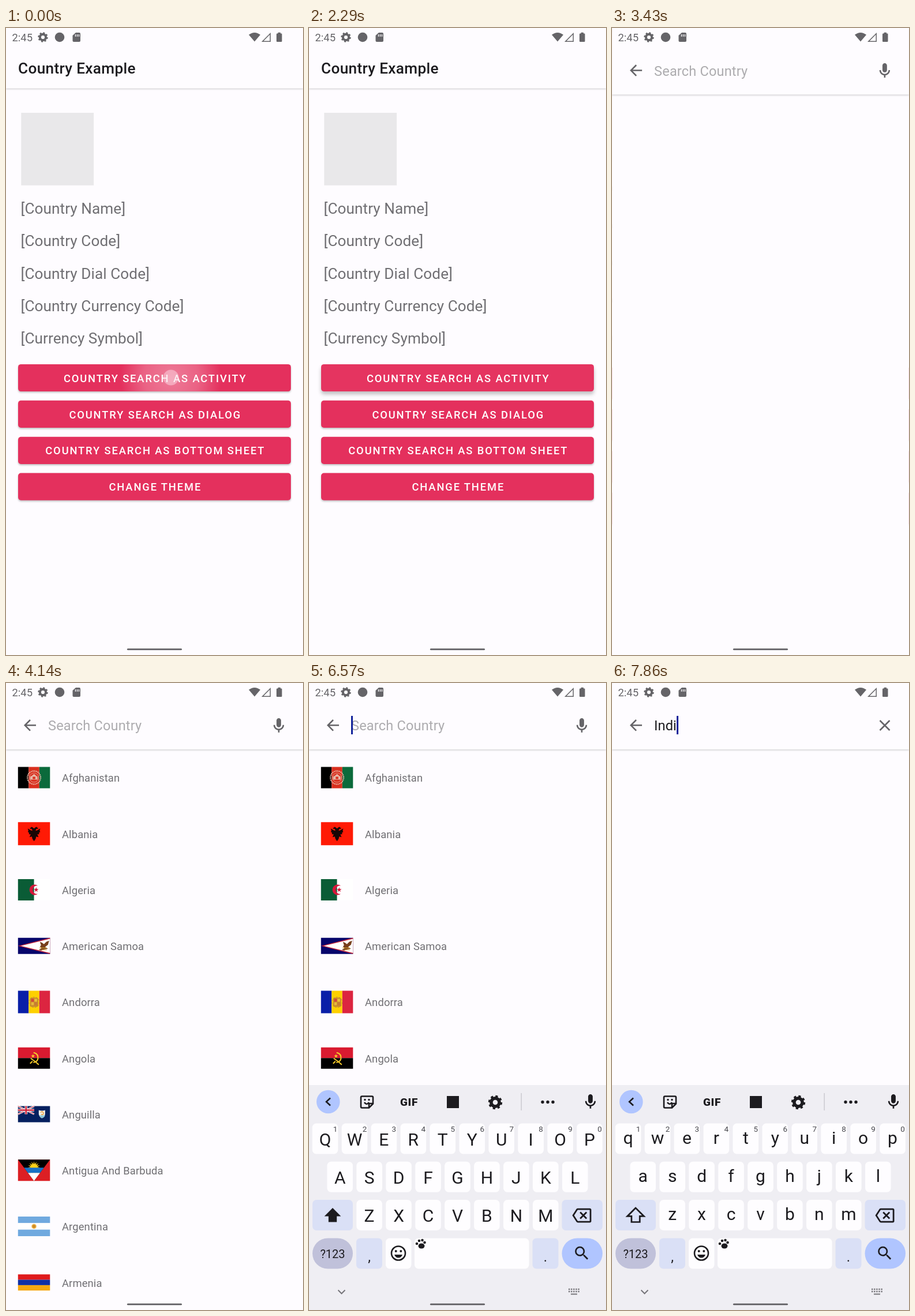
These frames come from a looping animation (515 px wide and 1087 px high, 8000 ms). An HTML page:

```html
<!DOCTYPE html>
<html lang="en">
<head>
<meta charset="utf-8">
<title>Country picker</title>
<style>
html, body { margin: 0; width: 100%; height: 100%; overflow: hidden; background: #fefcff; }
svg { display: block; width: 100vw; height: 100vh; font-family: Roboto, "Noto Sans", sans-serif; }
.bar { fill: #fefcff; filter: drop-shadow(0 1px 1.5px rgba(0,0,0,.22)); }
.button { fill: #e4305d; filter: drop-shadow(0 2px 1.5px rgba(0,0,0,.24)); }
.label { fill: #fff; font-size: 18.36px; font-weight: 500; letter-spacing: 1.86px; text-anchor: middle; }
.line { fill: none; stroke-width: 2.6; }
.mid { text-anchor: middle; }
</style>
</head>
<body>
<svg id="stage" viewBox="0 0 515 1087"></svg>
<script>
const GREY = '#656468', INK = '#1c1b1f', PAPER = '#fefcff';

const rect = (x, y, w, h, fill, r = 0, more = '') =>
  `<rect x="${x}" y="${y}" width="${w}" height="${h}" rx="${r}" fill="${fill}" ${more}/>`;
const dot = (x, y, r, fill, more = '') => `<circle cx="${x}" cy="${y}" r="${r}" fill="${fill}" ${more}/>`;
const path = (d, fill, more = '') => `<path d="${d}" fill="${fill}" ${more}/>`;
const line = (d, color, more = '') => `<path class="line" d="${d}" stroke="${color}" ${more}/>`;
const text = (x, y, size, fill, s, more = '') =>
  `<text x="${x}" y="${y}" font-size="${size}" fill="${fill}" ${more}>${s}</text>`;
const group = (id, body, more = '') => `<g id="${id}" ${more}>${body}</g>`;
const icon = (x, y, size, d, fill, more = '') =>
  path(d, fill, `transform="translate(${x} ${y}) scale(${size / 24}) translate(-12 -12)" ${more}`);
const star = (x, y, outer, inner, n, fill) => {
  const pts = Array.from({ length: 2 * n }, (_, i) => {
    const a = Math.PI * (i / n - .5), r = i % 2 ? inner : outer;
    return (x + r * Math.cos(a)).toFixed(2) + ',' + (y + r * Math.sin(a)).toFixed(2);
  });
  return `<polygon points="${pts.join(' ')}" fill="${fill}"/>`;
};
const gear = (x, y, r, fill) => {
  const tooth = 2 * Math.PI * r * .84 / 16;
  return dot(x, y, r * .58, 'none', `stroke="${fill}" stroke-width="${r * .46}"`) +
    dot(x, y, r * .84, 'none', `stroke="${fill}" stroke-width="${r * .3}" stroke-dasharray="${tooth}"`);
};

const MIC = 'M12 14c1.66 0 3-1.34 3-3V5c0-1.66-1.34-3-3-3S9 3.34 9 5v6c0 1.66 1.34 3 3 3zm5-3c0 2.76-2.24 5-5 5s-5-2.24-5-5H5c0 3.53 2.61 6.43 6 6.92V21h2v-3.08c3.39-.49 6-3.39 6-6.92z';
const LENS = 'M15.5 14h-.79l-.28-.27A6.47 6.47 0 0 0 16 9.5 6.5 6.5 0 1 0 9.5 16c1.61 0 3.09-.59 4.23-1.57l.27.28v.79l5 4.99L20.49 19zm-6 0a4.5 4.5 0 1 1 0-9 4.5 4.5 0 0 1 0 9z';
const ERASE = 'M7 4h15q1 0 1 1v14q0 1-1 1H7q-.6 0-1-.6L1.2 12 6 4.6Q6.4 4 7 4zM10 8l8 8M18 8l-8 8';
const SHIFT = 'M12 3 2 13h5v7h10v-7h5z';

function statusBar() {
  return text(10.5, 23, 18.4, GREY, '2:45') + gear(64, 16, 8.8, GREY) + dot(93, 16, 8.3, GREY) +
    path('M121 8h6q2 0 2 2v12q0 2-2 2h-9.500q-2 0-2-2v-9z', GREY) +
    line('M120.500 11v4M123.500 11v4M126.500 11v4', PAPER, 'style="stroke-width:1.3"') +
    path('M431 23.500 421 11.800Q431 4 441 11.800z', GREY) +
    line('M444.800 23.200h13.400v-13.400z', GREY, 'style="stroke-width:1.500"') +
    rect(469, 9.5, 9.5, 14.5, GREY, 1.2) + rect(471.5, 7.8, 4.5, 3, GREY);
}

function home() {
  const fields = ['Country Name', 'Country Code', 'Country Dial Code', 'Country Currency Code', 'Currency Symbol'];
  const buttons = ['ACTIVITY', 'DIALOG', 'BOTTOM SHEET'].map(s => 'COUNTRY SEARCH AS ' + s).concat('CHANGE THEME');
  return rect(0, 0, 515, 1087, PAPER) + rect(0, -30, 515, 134.7, PAPER, 0, 'class="bar"') +
    text(21, 78.5, 26.2, INK, 'Country Example', 'font-weight="500" letter-spacing=".33"') +
    rect(26.3, 147, 125.8, 125.8, '#e9e8ea') +
    fields.map((s, i) => text(25.5, 322 + 56.25 * i, 26.2, '#706f73', `[${s}]`, 'letter-spacing=".05"')).join('') +
    buttons.map((s, i) => {
      const y = 582.9 + 62.9 * i;
      const glow = i ? '' : rect(21, y, 473, 47.2, '#fff', 5, 'id="lift"') +
        group('ripple', dot(286, 606, 1, 'url(#glow)', 'id="wave"'), 'clip-path="url(#face)"');
      return rect(21, y, 473, 47.2, '#e4305d', 5, `class="button" id="b${i}"`) + glow +
        text(258.8, y + 30.7, 18.36, '#fff', s, 'class="label"');
    }).join('') +
    dot(286, 606, 13.5, '#fbdbe5', 'id="press" fill-opacity=".5"');
}

const W = 55.5;
const columns = (h, ...c) => c.map((f, i) => rect(W / c.length * i, 0, W / c.length, h, f)).join('');
const rows = (h, ...c) => c.map((f, i) => rect(0, h / c.length * i, W, h / c.length, f)).join('');
const ring = (x, y, r, color, w, more = '') => dot(x, y, r, 'none', `stroke="${color}" stroke-width="${w}" ${more}`);

// name, flag height, flag drawing
const countries = [
  ['Afghanistan', 37, h => columns(h, '#000', '#d9301f', '#0b6a3b') +
    ring(27.8, 18.500, 11.5, '#e9b9a8', 2, 'stroke-dasharray="2 1"') + ring(27.8, 18.5, 8, '#e59a8a', 1) +
    path('M21 22h13v-5l-3-2q-3-5-6.500 0l-3.500 2z', '#e8b5a5') + rect(25.5, 17, 4.5, 4, '#d9301f')],
  ['Albania', 40, h => rect(0, 0, W, h, '#ff1a05') +
    path('M27.800 11 24 8l-4 3 4 1 1 3-3-1-5-3 1 4-1 2 2 1 0 3 3 0-2 5 4-1 1 4 2.800 4 2.800-4 1-4 4 1-2-5 3 0 0-3 2-1-1-2 1-4-5 3-3 1 1-3 4-1-4-3z', '#180605')],
  ['Algeria', 37, h => rect(0, 0, W, h, '#fff') + rect(0, 0, W / 2, h, '#0a5c36') +
    path('M34.500 11.500a9 9 0 1 0 0 14 7.200 7.200 0 1 1 0-14z', '#d6183b') + star(31.5, 18.5, 4.4, 1.8, 5, '#d6183b')],
  ['American Samoa', 28, h => rect(0, 0, W, h, '#07066b') +
    path(`M${W} 0 0 14 ${W} 28z`, '#c2263b') + path(`M${W} 1.800 5 14 ${W} 26.200z`, '#fff') +
    path('M38 7q4 1 7 4l4-4 5-2-2 7-5 4 5 3-6 1-6 2-4-1 5-3-3-3 2-2z', '#78401c') +
    line('M37 17.500h13M41 21h9', '#d8a52a', 'style="stroke-width:1.200"')],
  ['Andorra', 39, h => columns(h, '#0a1fa8', '#fed000', '#dc2540') +
    rect(21, 12, 14, 16, '#c98a2c', 3) + rect(23, 14, 4.5, 5, '#d6453a') + rect(28.5, 14, 4.5, 5, '#e8c23a') +
    rect(23, 20, 4.5, 5, '#e6b93a') + rect(28.5, 20, 4.5, 5, '#c77a35') + ring(28, 20, 9, '#b88a3a', 1, 'stroke-dasharray="3 2"')],
  ['Angola', 37, h => rows(h, '#d91a30', '#000') +
    line('M27 9q9 2 7.500 11-2 6-8 6', '#f5cb2a', 'style="stroke-width:2.200"') +
    line('M22 19q8 5 14 11M21 28l4-4', '#f5cb2a', 'style="stroke-width:2"') + star(26, 15, 3.6, 1.5, 5, '#f5cb2a')],
  ['Anguilla', 28, h => rect(0, 0, W, h, '#06205f') +
    line('M0 0 28 14M28 0 0 14', '#fff', 'style="stroke-width:3"') +
    line('M0 0 28 14M28 0 0 14', '#d02038', 'style="stroke-width:1"') +
    line('M14 0v14M0 7h28', '#fff', 'style="stroke-width:4.600"') +
    line('M14 0v14M0 7h28', '#d02038', 'style="stroke-width:2.600"') +
    path('M36 7q6 2 11 0v7q-1 5-5.500 7-4.500-2-5.500-7z', '#f4f2ea') + path('M37 16h10q-1 4-5.500 5-3.500-1-4.500-5z', '#8cc6d8') +
    line('M39 11q4-3 5 1t-4 2', '#e79a38', 'style="stroke-width:1.500"')],
  ['Antigua And Barbuda', 37, h => rect(0, 0, W, h, '#dc1f24') + path(`M0 0H${W}L27.750 ${h}z`, '#000') +
    star(27.75, 14, 11, 6, 16, '#fcd118') + path('M10.500 14h34.500l-6.700 9h-21z', '#1772c6') + path('M17.250 23h21l-10.500 14z', '#fff')],
  ['Argentina', 34, h => rows(h, '#70a9df', '#fff', '#70a9df') + star(27.75, 17, 5, 3.3, 16, '#e9a52c') + dot(27.75, 17, 2.3, '#c98a2c')],
  ['Armenia', 28, h => rows(h, '#e01a1c', '#1030a5', '#f6a810')],
];

function search() {
  return rect(0, 0, 515, 1087, PAPER) +
    group('list', countries.map(([name, h, draw], i) => {
      const y = 164 + 97.25 * i;
      return `<g transform="translate(20.800 ${y - h / 2})">${draw(h)}</g>` +
        text(97, y + 7.4, 18.4, '#706f73', name, 'letter-spacing=".12"');
    }).join('')) +
    rect(0, -30, 515, 145.2, PAPER, 0, 'class="bar"') +
    line('M52 73.300H33M42 64 32.800 73.300 42 82.600', GREY) +
    text(73, 82.3, 23.6, '#adacaf', 'Search Country', 'id="hint" letter-spacing=".15"') +
    text(73, 82.3, 23.6, INK, '', 'id="query" letter-spacing=".1"') +
    rect(0, 57, 3, 32, '#12239a', 0, 'id="caret"') +
    icon(473, 74, 31.5, MIC, GREY, 'id="mic"') +
    line('M464.500 65l17 17M481.500 65l-17 17', GREY, 'id="clear"') +
    dot(160, 72, 14.5, '#fff', 'id="tap" fill-opacity=".6" stroke="#c3cbe0" stroke-width="1.500"');
}

const keyRows = [['qwertyuiop', 28], ['asdfghjkl', 53.7], ['zxcvbnm', 104.6]];
const STEP = 50.95;

function letters(upper) {
  return keyRows.map(([s, x0], r) => [...s].map((c, i) =>
    text(x0 + STEP * i, (upper ? 801.5 : 799) + 66.2 * r, 30, INK, upper ? c.toUpperCase() : c, 'class="mid"')).join('')).join('') +
    icon(41, 923, 34.5, SHIFT, upper ? INK : 'none', `stroke="${INK}" stroke-width="${upper ? 0 : 1.9}"`);
}

function keyboard() {
  const key = (x, y, w, fill = '#fefdff', r = 7) => rect(x, y, w, 53, fill, r);
  const blue = '#b0c5ff', pale = '#dae0f6';
  return rect(0, 697, 515, 400, '#efeef3') +
    dot(33.3, 726, 20.3, blue) + line('M37 719.500 30 726l7 6.500', INK) +
    line('M92 716.500h17q2 0 2 2v11l-7 7h-12q-2 0-2-2v-16q0-2 2-2zM104 736v-5q0-2 2-2h5M96 727q4 6 8 0', INK) +
    dot(97, 722.5, 1.7, INK) + dot(104, 722.5, 1.7, INK) +
    text(173.5, 733, 19, INK, 'GIF', 'class="mid" font-weight="900" letter-spacing=".6"') +
    rect(239, 716, 21, 21, INK) + gear(323, 727, 12.3, INK) + rect(367.5, 711, 1.3, 30, '#c5c4ca') +
    [405, 414, 423].map(x => dot(x, 726.5, 2.7, INK)).join('') + icon(488, 726, 31.5, MIC, INK) +
    keyRows.map(([s, x0], r) => [...s].map((_, i) => key(x0 + STEP * i - 22.3, 763.5 + 66.2 * r, 44.6)).join('')).join('') +
    [...'1234567890'].map((d, i) => text(45.5 + STEP * i, 778, 13.5, '#46464c', d, 'class="mid"')).join('') +
    key(6, 896, 70, pale) + key(438.5, 896, 70.5, pale) + icon(473, 923, 33, ERASE, 'none', `stroke="${INK}" stroke-width="2"`) +
    key(6, 962.5, 70, '#c0c1da', 26.5) + text(41, 997, 20, INK, '?123', 'class="mid"') +
    key(82, 962.5, 45, pale) + text(104.5, 1003, 24, INK, ',', 'class="mid"') +
    key(133, 962.5, 44.5) + ring(155, 988.5, 12, INK, 2.6) + dot(150.7, 985, 2, INK) + dot(159.3, 985, 2, INK) +
    path('M148 991h14q-2 5.500-7 5.500t-7-5.500z', INK) +
    key(183, 962.5, 198.5) +
    `<ellipse cx="195" cy="976" rx="5.500" ry="4.500" fill="${INK}"/>` +
    [[187, 972], [191, 967], [196.5, 966], [200.5, 970]].map(([x, y]) => dot(x, y, 2.3, INK)).join('') +
    key(387.5, 962.5, 45, pale) + text(410, 1003, 24, INK, '.', 'class="mid"') +
    key(438.5, 962.5, 70.5, blue, 26.5) + icon(473, 988.5, 31.5, LENS, INK) +
    group('upper', letters(true)) + group('lower', letters(false)) +
    line('M50.500 1052.500l6 6 6-6', '#77767b', 'style="stroke-width:2"') +
    [1051, 1055].map(y => line(`M450 ${y}h19`, '#77767b', 'stroke-dasharray="2.400 1.700"')).join('') +
    line('M454 1059.500h11', '#77767b', 'style="stroke-width:2"');
}

document.getElementById('stage').innerHTML =
  `<defs><radialGradient id="glow"><stop offset="0" stop-color="#fff" stop-opacity=".36"/>
   <stop offset=".55" stop-color="#fff" stop-opacity=".24"/><stop offset="1" stop-color="#fff" stop-opacity="0"/></radialGradient>
   <clipPath id="face">${rect(21, 582.9, 473, 47.2, '#000', 5)}</clipPath></defs>` +
  group('home', home()) + group('search', search()) + group('keyboard', keyboard()) +
  statusBar() + rect(210, 1075.8, 95, 2.8, '#5f5e62', 1.4);

const $ = id => document.getElementById(id);
const show = (id, on) => { $(id).style.display = on ? '' : 'none'; };
const fade = (id, a) => { $(id).style.opacity = a; };
const ramp = (t, from, to) => Math.min(1, Math.max(0, (t - from) / (to - from)));
const zoom = (id, s) => $(id).setAttribute('transform', `translate(257.5 543.5) scale(${s}) translate(-257.5 -543.5)`);
// slow start, sharp rise, long settle
const settle = u => u >= 1 ? 1 : u < 1 / 6 ? .4 * (6 * u) ** 4.4 : 1 - .6 * Math.exp(-8 * (u - 1 / 6));

function drawHome(t) {
  show('press', t < 100);
  $('wave').setAttribute('r', 88 + t * .75);
  fade('ripple', 1 - ramp(t, 0, 600));
  const lift = ramp(t, 0, 430) * (1 - ramp(t, 2200, 2570));
  fade('lift', .025 * lift);
  $('b0').style.filter = `drop-shadow(0 ${2 + 4 * lift}px ${1.5 + 2.5 * lift}px rgba(0,0,0,.24))`;
}

function drawSearch(t) {
  const typed = 'Indi'.slice(0, [7140, 7420, 7565, 7850].filter(at => t >= at).length);
  fade('list', t < 3990 || t >= 7850 ? 0 : t < 4130 ? .6 : 1);
  show('tap', t >= 5995 && t < 6130);
  show('hint', !typed);
  show('mic', !typed);
  show('clear', typed);
  show('caret', typed || t >= 6130 && t < 6700);
  $('query').textContent = typed;
  $('caret').setAttribute('x', typed ? 73.2 + $('query').getComputedTextLength() : 73);

  const rise = 1 - (1 - ramp(t, 6180, 6480)) ** 3;
  show('keyboard', rise > 0);
  $('keyboard').setAttribute('transform', `translate(0 ${390 * (1 - rise)})`);
  show('upper', t < 7280);
  show('lower', t >= 7280);
}

function draw(now) {
  const t = Math.floor((now % 8000 + 4) * 7 / 1000) % 56 * 1000 / 7;
  const open = settle(ramp(t, 3100, 3500));
  show('home', t < 3500);
  zoom('home', 1 + .15 * open);
  show('search', t > 3150);
  zoom('search', .85 + .15 * open);
  fade('search', ramp(t, 3150, 3233));
  drawHome(t);
  drawSearch(t);
}

const start = performance.now();
function tick() {
  draw(performance.now() - start);
  requestAnimationFrame(tick);
}
tick();
</script>
</body>
</html>
```
